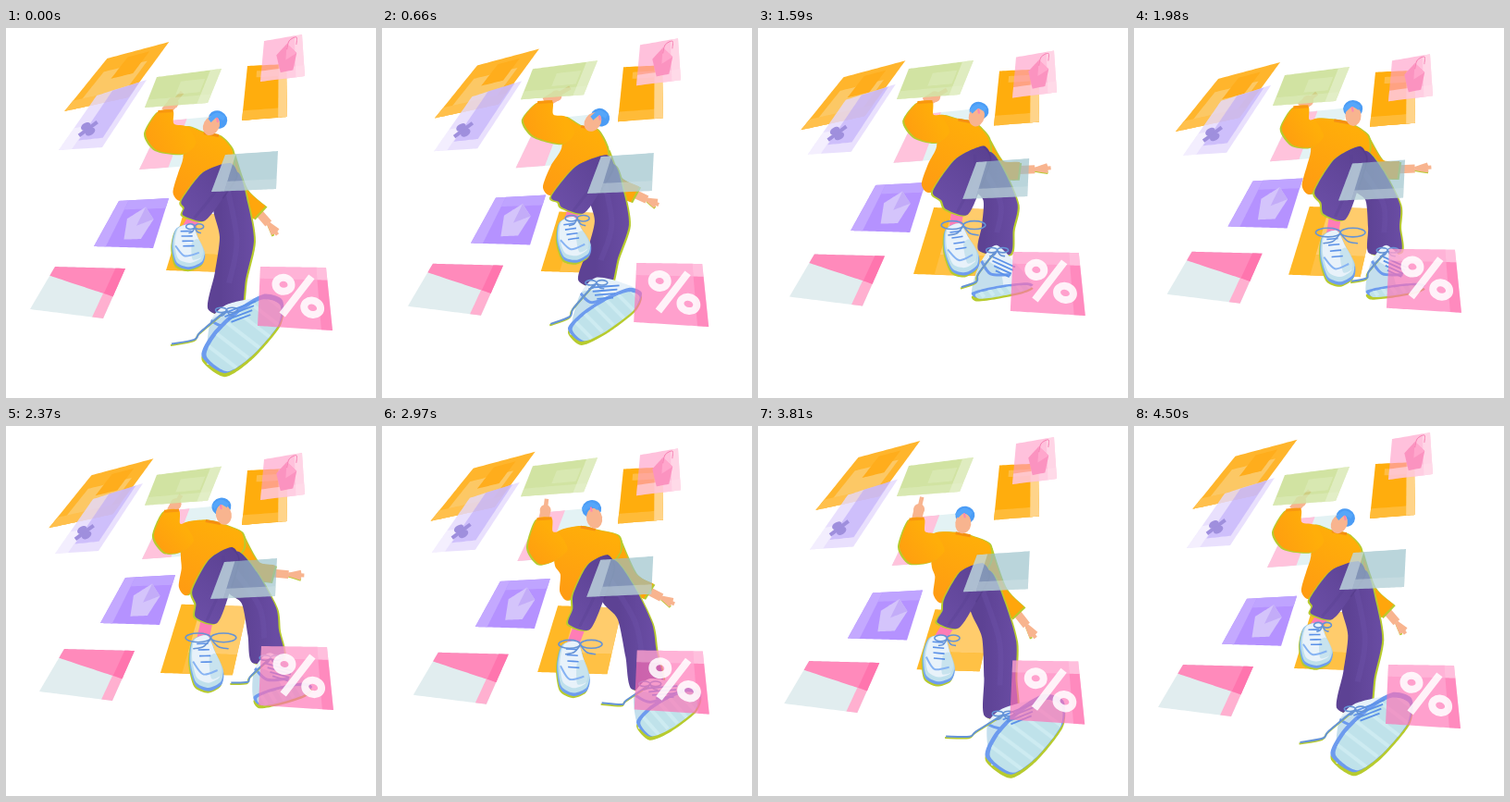
Animation, 400 px wide and 400 px high, one loop 4530 ms. Source, as an HTML page with a canvas:

```html
<!DOCTYPE html>
<html lang="en">
<head>
<meta charset="utf-8">
<title>Walking among cards</title>
<style>
html, body { margin: 0; width: 100%; height: 100%; overflow: hidden; background: #fff; }
canvas { display: block; width: 100vw; height: 100vh; }
</style>
</head>
<body>
<canvas id="stage" width="400" height="400"></canvas>
<script>
const ctx = document.getElementById('stage').getContext('2d');
const LOOP = 4530, STEP = 30;
const GREEN = '#b7cb2e', BLUE = '#6d9bee', LACE = '#6593d6', SKIN = '#f8b48f', PINK = '#ff7db6';

// Every joint swings once per loop: x and y each as [centre, cosine, sine].
const JOINTS = {
  neck: [[223, -1, 1], [108.5, 6, -6]],
  face: [[229, -7, 4], [100.5, 5, -2.5]],
  hair: [[231.5, -2.5, 7.5], [93, 6, 0]],
  shoulder: [[191.5, 1, 4], [106, 1, -13]],
  elbow: [[161.5, -4.5, 0], [124, -1, -19]],
  wrist: [[176, -3.5, 3], [90.5, 0, -12.5]],
  finger: [[191, -.5, 16], [71.5, -2, -7.5]],
  shoulder2: [[249, -5, -4], [123, 8, 0]],
  elbow2: [[258.5, -7, -5], [165.5, 13, -8]],
  wrist2: [[281, -7, -4], [178.5, 21, -14.5]],
  finger2: [[308, -14.5, 0], [190.5, 33, -24.5]],
  hem: [[183, -2.5, -9.5], [175.5, 2.5, -6.5]],
  hip: [[195, -5, -11], [181.5, 4.5, -3]],
  knee: [[246, -1, 0], [145, 8, -7]],
  cuff: [[210.5, -7, 1], [207, -1.5, -11]],
  heel: [[201, -9, 4.5], [222, -6.5, -12.5]],
  toe: [[211, -11.5, 10.5], [271.5, -11.5, -15.5]],
  knee2: [[261, -11.5, -7], [210, 18, -13]],
  cuff2: [[258, -22.5, -19.5], [278.5, 29, -23]],
  soleLeft: [[242, -22.5, -29.5], [328, 35.5, -23]],
  soleRight: [[310, -15, -29], [287.5, 7, -7]],
  lace: [[210.5, -31.5, -11.5], [308.5, 33, -11]]
};

// Cards: corners clockwise from top left, drift over half a loop,
// boxes as [color, left, top, right, bottom] in card units.
const backCards = [
  { at: [110,32, 177,14, 133,74, 64,89], drift: [-19, 23], delay: -285, boxes: [
    ['#ffb52c', 0, 0, 1, 1], ['#fcc865', .15, .3, .85, 1], ['#ffad1c', .4, .1, .75, .5], ['#ffc04c', 0, .8, 1, 1]] },
  { at: [98,73, 152,56, 104,129, 57,132], drift: [-4, 6], boxes: [
    ['#e4dafdd0', 0, 0, 1, 1], ['#b8a3f988', .32, 0, .86, .85], ['#ffffff77', 0, .6, .3, 1]],
    percent: ['#9f8fdd', .36, .66, .5, .32, 4] },
  { at: [261,41, 303,39, 304,96, 255,100], drift: [0, 7], boxes: [
    ['#ffad0d', 0, 0, 1, 1], ['#ffbb38', 0, .82, 1, 1], ['#ffd48a', .8, 0, 1, 1], ['#ffbd45', .25, .1, .8, .22]] },
  { at: [169,101, 228,95, 214,148, 144,153], drift: [3, -9], boxes: [
    ['#e3f2f4', 0, 0, 1, 1], ['#ffc3dc', 0, 0, .45, 1]] },
  { at: [122,187, 176,184, 159,238, 95,236], drift: [7, -23], delay: 90, boxes: [
    ['#b592ff', 0, 0, 1, 1], ['#c4a9ff', 0, 0, .2, 1], ['#bfa4ff', .2, 0, 1, .2]], tag: ['#d4c4fb', '#c3acf8'] },
  { at: [192,200, 252,202, 238,264, 173,262], drift: [2, -1], grow: .2, boxes: [
    ['#ffb826', 0, 0, 1, 1], ['#ffcc6c', .3, 0, 1, .7], ['#ffc145', .3, .7, 1, 1]] },
  { at: [53,258, 129,260, 105,314, 26,304], drift: [10, -17], boxes: [
    ['#e1edef', 0, 0, 1, 1], ['#ffb0d0', .85, .5, 1, 1]], wedge: ['#ff8abb', .21, .56] }];
const frontCards = [
  { at: [163,46, 233,37, 218,74, 150,79], drift: [0, 0], tap: 7, boxes: [
    ['#bfd97fb8', 0, 0, 1, 1], ['#e0edc088', 0, .74, 1, 1], ['#e9f3d499', .83, 0, 1, 1], ['#dfedbf88', .42, .25, .8, .65]] },
  { at: [237,137, 294,133, 292,174, 222,177], drift: [-1, 10], boxes: [
    ['#97bfc9a8', 0, 0, 1, 1], ['#dcebee77', 0, 0, .2, 1], ['#d4e3e666', .2, .74, 1, 1]] },
  { at: [275,258, 346,259, 353,327, 272,322], drift: [1, -20], boxes: [
    ['#ff71b5aa', 0, 0, 1, 1], ['#ffd0e666', 0, 0, .85, .2], ['#ff79b388', .85, .2, 1, 1], ['#ffd9ea88', .85, 0, 1, .2]],
    percent: ['#ffffffdd', .55, .47, 1, 1, 8] },
  { at: [279,14, 320,7, 323,52, 275,58], drift: [0, 22], boxes: [
    ['#ff9dc8a0', 0, 0, 1, 1], ['#ffd5e6aa', 0, .74, 1, 1], ['#ffe0ecaa', .8, 0, 1, 1]],
    tag: ['#fb93c0', '#ffa6cc'], hook: '#f77fb2' }];
const TAG = [[.34, .4], [.6, .16], [.84, .42], [.74, .82], [.45, .84]];

const mix = (p, q, k) => [p[0] + (q[0] - p[0]) * k, p[1] + (q[1] - p[1]) * k];
const add = (p, x, y) => [p[0] + x, p[1] + y];
const move = (pts, x, y) => pts.map(p => add(p, x, y));
const shrink = (pts, to, k) => pts.map(p => mix(p, to, k));
const swing = ([c, a, b], w) => c + a * Math.cos(w) + b * Math.sin(w);

// Point at fraction u from a to b, pushed v pixels to the side.
function side(a, b, u, v) {
  const dx = b[0] - a[0], dy = b[1] - a[1], len = Math.hypot(dx, dy) || 1;
  return [a[0] + dx * u + dy / len * v, a[1] + dy * u - dx / len * v];
}
function curve(pts, closed, k = .13) {
  const n = pts.length;
  const at = i => closed ? pts[(i + n) % n] : pts[Math.max(0, Math.min(n - 1, i))];
  ctx.beginPath();
  ctx.moveTo(...pts[0]);
  for (let i = 0; i < (closed ? n : n - 1); i++) {
    const [a, b, c, d] = [at(i - 1), at(i), at(i + 1), at(i + 2)];
    ctx.bezierCurveTo(b[0] + (c[0] - a[0]) * k, b[1] + (c[1] - a[1]) * k,
      c[0] - (d[0] - b[0]) * k, c[1] - (d[1] - b[1]) * k, ...c);
  }
  if (closed) ctx.closePath();
}
function blob(pts, color, k) {
  curve(pts, true, k);
  ctx.fillStyle = color;
  ctx.fill();
}
function line(pts, color, width, closed) {
  curve(pts, closed, .16);
  ctx.strokeStyle = color;
  ctx.lineWidth = width;
  ctx.stroke();
}
function fringed(pts, color, dx, dy) {
  blob(move(pts, dx, dy), GREEN);
  blob(pts, color);
}
function oval(x, y, rx, ry, turn, color) {
  ctx.beginPath();
  ctx.ellipse(x, y, rx, ry, turn, 0, 7);
  ctx.fillStyle = color;
  ctx.fill();
}
function ring(x, y, rx, ry) {
  return Array.from({ length: 8 }, (_, i) => [x + rx * Math.cos(i * Math.PI / 4), y + ry * Math.sin(i * Math.PI / 4)]);
}
function shade([x0, y0], [x1, y1], from, to) {
  const g = ctx.createLinearGradient(x0, y0, x1, y1);
  g.addColorStop(0, from);
  g.addColorStop(1, to);
  return g;
}

function drawCard(card, w) {
  const delay = 2 * Math.PI * (card.delay || 0) / LOOP;
  const k = .5 - .5 * Math.cos(w - delay);
  const [a, b, c, d] = [0, 2, 4, 6].map(i => [card.at[i], card.at[i + 1]]);
  const mid = mix(mix(a, c, .5), mix(b, d, .5), .5);
  const bob = (card.tap || 0) * Math.cos(2 * w);
  const q = move(shrink([a, b, c, d], mid, -(card.grow || 0) * k), card.drift[0] * k, card.drift[1] * k + bob);
  const at = ([u, v]) => mix(mix(q[0], q[1], u), mix(q[3], q[2], u), v);
  const shape = (pts, color) => blob(pts.map(at), color, 0);

  for (const [color, l, t, r, m] of card.boxes) shape([[l, t], [r, t], [r, m], [l, m]], color);
  if (card.wedge) {
    const [color, left, right] = card.wedge;
    shape([[0, 0], [1, 0], [1, right], [0, left]], color);
    shape([[.86, 0], [1, 0], [1, right], [.86, right - .05]], '#ff75ae');
  }
  if (card.tag) {
    shape(TAG, card.tag[0]);
    shape([TAG[1], TAG[2], [.57, .55]], card.tag[1]);
  }
  if (card.hook) line([[.6, .3], [.66, .1], [.85, .04], [.84, .22]].map(at), card.hook, 1);
  if (card.percent) {
    const [color, u, v, sx, sy, width] = card.percent;
    line([[u + .22 * sx, v - .32 * sy], [u - .22 * sx, v + .32 * sy]].map(at), color, width);
    for (const s of [-1, 1]) line(ring(u + .2 * s * sx, v + .18 * s * sy, .115 * sx, .115 * sy).map(at), color, width, true);
  }
}

function drawHands(j) {
  const palm = mix(j.wrist, j.finger, .45);
  line([j.wrist, palm], SKIN, 11);
  oval(...palm, 6, 6, 0, SKIN);
  line([palm, j.finger], SKIN, 4.5);
  const palm2 = mix(j.wrist2, j.finger2, .5);
  line([mix(j.wrist2, j.elbow2, .2), palm2], SKIN, 9);
  for (let i = -1; i < 2; i++) {
    const tip = side(j.wrist2, j.finger2, 1 - Math.abs(i) * .1, i * 3.5);
    if (i < 0) line(move([palm2, tip], 0, 1.5), GREEN, 3);
    line([palm2, tip], SKIN, 4);
  }
}

function drawTop(j) {
  const arm2 = [add(j.shoulder2, -7, 7), j.elbow2, j.wrist2];
  line(move(arm2, 2, 1), GREEN, 19);
  line(arm2, '#ffa60c', 19);
  const body = [j.shoulder, add(j.neck, -9, -2), add(j.neck, 9, 2), j.shoulder2, add(j.shoulder2, 2, 18),
    add(j.knee, -6, 10), add(mix(j.knee, j.hem, .5), 0, 5), add(j.hem, 9, 9), j.hem,
    add(mix(j.hem, j.shoulder, .3), 2, 0), add(j.shoulder, -1, 33)];
  fringed(body, shade(j.neck, j.hem, '#ffae09', '#ff9c12'), 2, 0);
  const sleeve = [add(j.wrist, -8, 0), add(j.wrist, 8, -1), add(j.wrist, 9, 13), add(j.shoulder, 4, 0),
    add(j.shoulder, 13, 17), add(j.shoulder, 0, 29), add(j.elbow, 6, 9), add(j.elbow, -6, -9)];
  fringed(sleeve, shade(j.shoulder, j.elbow, '#ffae09', '#ffa00f'), -2, 1);
  line(sleeve.slice(0, 2), '#f9970f', 3);
  line([add(j.neck, -8, -1), add(j.neck, 8, 2)], '#f58f12', 3);

  const [x, y] = j.face, [hx, hy] = j.hair;
  const turn = Math.atan2(hx - x, y - hy) * .6;
  oval(hx, hy, 10.5, 9.5, turn, '#4b9cf5');
  oval(x, y, 8.5, 11, turn, SKIN);
  line([[hx - 9, hy + 1], [hx - 1, hy - 5], [hx + 7, hy - 1]], '#55a6fa', 5);
  line([[hx - 1, hy - 2], [hx, hy + 3]], '#ff86b0', 2);
}

function drawFarLeg(j, w) {
  const hip = add(j.knee, -9, 6), knee = j.knee2, cuff = j.cuff2;
  line([cuff, mix(cuff, j.soleRight, .25)], PINK, 14);
  const edge = s => [side(hip, knee, 0, 15 * s), side(hip, knee, .5, 19 * s),
    side(hip, cuff, .5, 0), side(knee, cuff, .5, 17 * s), side(knee, cuff, 1, 17 * s)]
    .map((p, i) => i === 2 ? add(knee, 18.5 * s, 2 * s) : p);
  const leg = [...edge(1), ...edge(-1).reverse()];
  fringed(leg, shade(add(knee, -18, 0), add(knee, 18, 0), '#5d4294', '#694ca3'), 2, 1);
  line([hip, knee, mix(knee, cuff, .6)], '#7054aa55', 6);

  // Shoe: the sole widens as the foot swings towards the viewer.
  const a = j.soleLeft, b = j.soleRight, wide = swing([15, 8.5, -6.5], w);
  const sole = [[0, .5], [.25, .95], [.6, 1], [.92, .7], [1.03, -.1], [.85, -.8], [.4, -1.05], [.06, -.8]]
    .map(([u, v]) => side(a, b, u, v * wide));
  const mid = mix(a, b, .5), back = add(cuff, -14, 9);
  const upper = [back, add(cuff, 2, -8), add(mix(cuff, b, .6), 0, -8), b, mid, a, mix(back, a, .75)];
  blob(move(sole, 0, 4), GREEN);
  blob(upper, '#e6f1f9');
  blob([back, mix(back, b, .35), mid, a], '#c4dfed');
  line([back, mix(back, mid, .45), mix(upper[2], mid, .4)], '#6b9aee', 3);
  blob(sole, BLUE);
  const inner = move(shrink(sole, mid, .09), 1, 2);
  blob(inner, '#bfe2ea');
  ctx.save();
  curve(inner, true);
  ctx.clip();
  for (let u = .15; u < 1; u += .16) line([side(a, b, u - .04, wide), side(a, b, u + .04, -wide)], '#cdebf1', 4);
  ctx.restore();
  for (let k = .1; k < .5; k += .13) {
    line([mix(mix(back, upper[1], .55), mid, k), mix(upper[2], mid, k)], '#5b91e8', 1.8);
  }

  const string = [cuff, add(mix(cuff, j.lace, .4), -3, 8), add(mix(cuff, j.lace, .6), 2, 9), j.lace];
  line(move(string, -1, 1.5), GREEN, 2);
  line(string, LACE, 2);
  drawBow(add(cuff, 3, -2), 12, 6);
}

function drawBow([x, y], w, h) {
  for (const s of [-1, 1]) {
    line(ring(x + s * w * .5, y - h * .1, w * .5, h * .45), LACE, 1.6, true);
    line([[x, y], [x + s * w * .3, y + h * .8], [x + s * w * .7, y + h]], LACE, 1.6);
  }
}

function drawNearLeg(j, w) {
  const { hip, knee, cuff, heel, toe } = j;
  line([cuff, mix(heel, toe, .15)], PINK, 13);
  const top = add(knee, -3, -7), outer = add(knee, 5, 7);
  const left = add(cuff, -12, -3), right = add(cuff, 11, 3);
  const leg = [hip, add(mix(hip, top, .5), -3, -10), top, outer, add(mix(outer, right, .5), 2, 0),
    right, left, add(mix(hip, left, .5), 2, 0)];
  fringed(leg, shade(left, outer, '#6b4ea6', '#5c4293'), -2, 1);
  line([add(knee, -12, 2), mix(knee, cuff, .45), cuff], '#583f9055', 3);
  line([top, outer, leg[4]], '#4f38847a', 1.5);

  const shoe = [[0, -8], [-.03, 9], [.35, 14], [.72, 18], [.95, 13], [1.02, -2], [.85, -15], [.4, -16]]
    .map(([u, v]) => side(heel, toe, u, v));
  fringed(shoe, shade(mix(heel, toe, .5), toe, '#7fb4ea', BLUE), -1, 2);
  blob(shrink(shoe, shoe[1], .06), '#bfe0ec');
  blob(shrink(shoe, shoe[1], .15), '#e8f2fa');
  blob([shoe[2], shoe[3], side(heel, toe, .8, 4), side(heel, toe, .4, 6)], '#b9dbe8aa');
  line([side(heel, toe, .4, -12), side(heel, toe, .68, -4), side(heel, toe, .66, 12)], '#86b3f3', 2);
  for (let u = .08; u < .5; u += .12) line([side(heel, toe, u, -4), side(heel, toe, u + .04, 8)], '#5b91e8', 1.6);
  const size = 18.5 - 9 * Math.cos(w);
  drawBow(side(heel, toe, .04, 12), size, 4 + size * .25);
}

function draw(t) {
  const w = 2 * Math.PI * t / LOOP, j = {};
  for (const name in JOINTS) j[name] = JOINTS[name].map(axis => swing(axis, w));
  ctx.fillStyle = '#fff';
  ctx.fillRect(0, 0, 400, 400);
  for (const card of backCards) drawCard(card, w);
  drawHands(j);
  drawTop(j);
  drawFarLeg(j, w);
  drawNearLeg(j, w);
  for (const card of frontCards) drawCard(card, w);
}

ctx.lineJoin = 'round';
const start = performance.now();
function tick() {
  const t = (performance.now() - start) % LOOP;
  draw(Math.floor(t / STEP) * STEP);
  requestAnimationFrame(tick);
}
tick();
</script>
</body>
</html>
```
